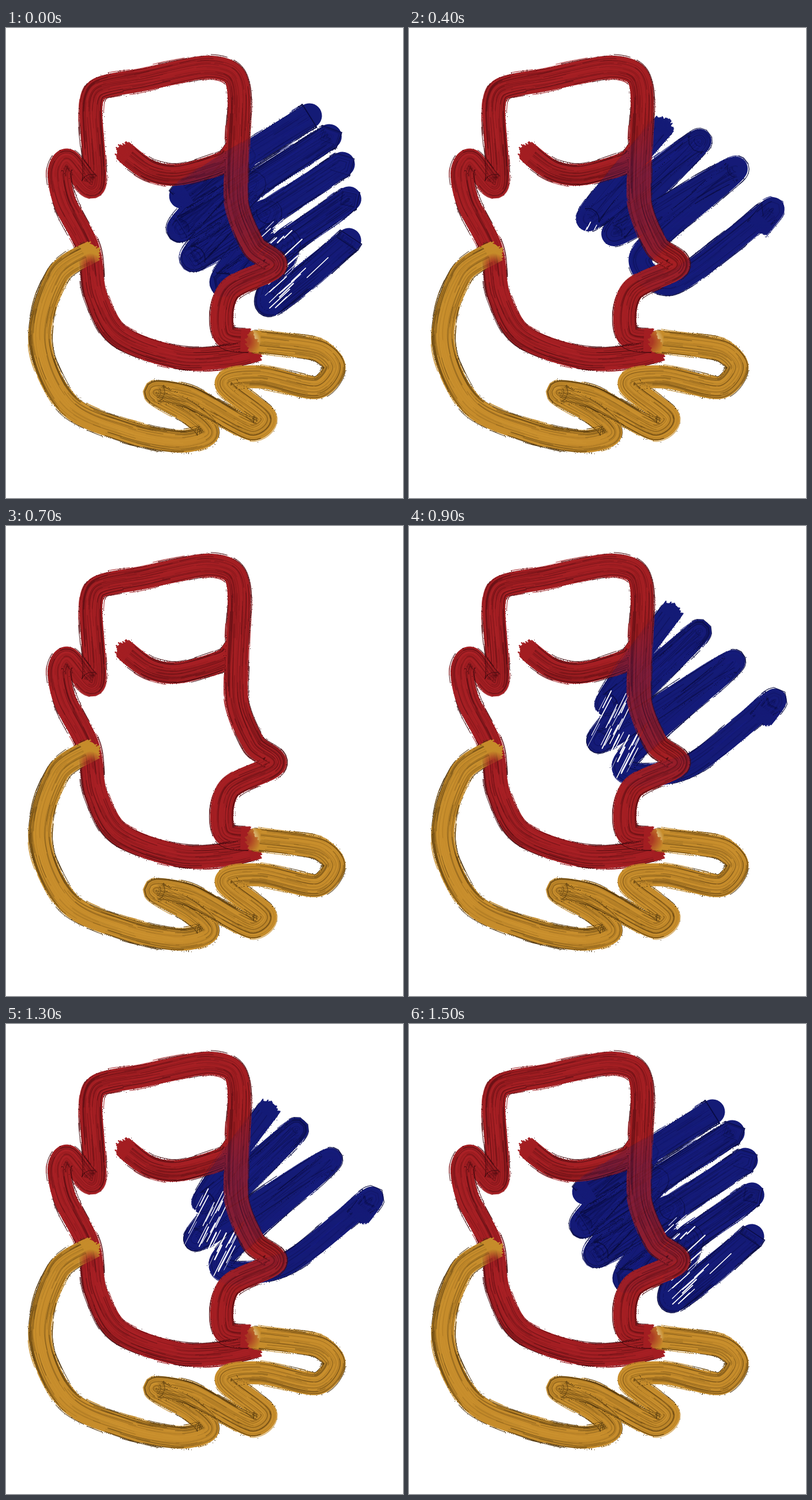
Write an HTML page with a canvas that moves like this. It is 688x814 px and loops after 1.6 s.

```html
<!DOCTYPE html>
<html lang="en">
<head>
<meta charset="utf-8">
<title>Painted face</title>
<style>
html, body { margin: 0; width: 100%; height: 100%; overflow: hidden; background: #fff; }
canvas { display: block; }
</style>
</head>
<body>
<canvas id="stage" width="688" height="814"></canvas>
<script>
const W = 688, H = 814, STEP = 100;
const stage = document.getElementById('stage').getContext('2d');

const RED = { base: '#a31e22', light: '#b2272b', dark: '#450a0f' };
const GOLD = { base: '#c68c2b', light: '#d29735', dark: '#50360e' };
const BLUE = { base: '#151b77', light: '#182087', dark: '#0a0d42' };

function rng(seed) {
  return () => {
    seed = (seed + 0x6D2B79F5) | 0;
    let t = Math.imul(seed ^ (seed >>> 15), 1 | seed);
    t = (t + Math.imul(t ^ (t >>> 7), 61 | t)) ^ t;
    return ((t ^ (t >>> 14)) >>> 0) / 4294967296;
  };
}

function layer() {
  const c = document.createElement('canvas');
  c.width = W;
  c.height = H;
  return c.getContext('2d');
}

const mix = (a, b, t) => a.map((v, i) => v + (b[i] - v) * t);
const add = (a, b) => a.map((v, i) => v + b[i]);
const dist = (a, b) => Math.hypot(b[0] - a[0], b[1] - a[1]);
const arc = ([a, c, b], t) => mix(mix(a, c, t), mix(c, b, t), t);

// Smooth curve through key points, sampled about every 3 px, with unit normals
function curve(keys) {
  const at = i => keys[Math.max(0, Math.min(keys.length - 1, i))];
  const tangent = (i, len) => {
    const a = at(i - 1), b = at(i + 1), d = dist(a, b) || 1;
    return [0, 1].map(k => (b[k] - a[k]) / d * Math.min(len, d / 2));
  };
  const s = [];
  for (let i = 0; i < keys.length - 1; i++) {
    const p = at(i), q = at(i + 1), len = dist(p, q);
    const m = tangent(i, len), w = tangent(i + 1, len);
    const n = Math.max(3, Math.round(len / 3));
    for (let j = 0; j < n; j++) {
      const t = j / n, u = 1 - t, ease = t * t * (3 - 2 * t);
      const [x, y] = [0, 1].map(k => p[k] + (q[k] - p[k]) * ease + t * u * (u * m[k] - t * w[k]));
      s.push({ x, y });
    }
  }
  s.forEach((q, i) => {
    const a = s[Math.max(0, i - 2)], b = s[Math.min(s.length - 1, i + 2)];
    const l = Math.hypot(b.x - a.x, b.y - a.y) || 1;
    q.nx = -(b.y - a.y) / l;
    q.ny = (b.x - a.x) / l;
  });
  return s;
}

function trace(g, s, from, to, offset) {
  g.beginPath();
  for (let i = Math.max(0, from); i < Math.min(s.length, to); i++) {
    const q = s[i], o = offset(i);
    g.lineTo(q.x + q.nx * o, q.y + q.ny * o);
  }
  g.stroke();
}

// A bristle brush: solid core, light and dark hairs, ragged rim, frayed ends
function brush(g, keys, width, tone, seed, hairs) {
  const s = curve(keys), rand = rng(seed), n = s.length, half = width / 2;
  const flip = () => (rand() < 0.5 ? -1 : 1);
  g.lineJoin = g.lineCap = 'round';
  g.globalAlpha = 1;
  g.strokeStyle = tone.base;
  g.lineWidth = width - 2;
  trace(g, s, 4, n - 4, () => 0);

  for (let k = 0; k < n * hairs; k++) {
    const dark = rand() < 0.62, side = rand() * 2 - 1;
    const from = Math.floor(rand() * (n + 20)) - 20, phase = rand() * 6;
    g.strokeStyle = dark ? tone.dark : tone.light;
    g.globalAlpha = dark ? 0.1 + 0.4 * rand() * (0.5 + Math.abs(side)) : 0.3;
    g.lineWidth = 0.6 + rand() * 1.3;
    trace(g, s, from, from + 12 + rand() * 48, i => side * (half - 1) + Math.sin(i / 14 + phase));
  }

  g.lineWidth = 1.2;
  g.globalAlpha = 0.8;
  for (let k = 0; k < n * 0.2; k++) {
    const o = flip() * (half - 1 + rand() * 2), from = Math.floor(rand() * n);
    g.strokeStyle = rand() < 0.5 ? tone.dark : tone.base;
    trace(g, s, from, from + 4 + rand() * 16, i => o + Math.sin(i / 5) * 0.6);
  }

  g.globalAlpha = 1;
  g.fillStyle = tone.dark;
  for (let k = 0; k < n * 1.5; k++) {
    const q = s[Math.floor(rand() * n)], o = flip() * (half - 1.5 + rand() * rand() * 4);
    g.fillRect(Math.round(q.x + q.nx * o), Math.round(q.y + q.ny * o), 1, 1);
  }

  g.lineWidth = 2.4;
  g.strokeStyle = tone.base;
  for (const [a, b] of [[s[0], s[5]], [s[n - 1], s[n - 6]]]) {
    const l = Math.hypot(a.x - b.x, a.y - b.y) || 1;
    for (let o = -half + 2; o < half - 1; o += 2) {
      const reach = 8 + (half - Math.abs(o) * 0.6) * (0.5 + rand() * 0.5);
      const x = b.x + a.nx * o, y = b.y + a.ny * o;
      g.beginPath();
      g.moveTo(x, y);
      g.lineTo(x + (a.x - b.x) / l * reach, y + (a.y - b.y) / l * reach);
      g.stroke();
    }
  }
}

// Dry patch: thin slits of bare paper
function scratch(g, { at, size, angle }, rand) {
  g.save();
  g.globalCompositeOperation = 'destination-out';
  g.translate(...at);
  g.rotate(angle);
  for (let k = 0; k < size / 3; k++) {
    const o = (rand() - 0.5) * size, from = (rand() - 0.6) * size * 1.5;
    g.lineWidth = 0.6 + rand() * 1.8;
    g.beginPath();
    g.moveTo(from, o);
    g.lineTo(from + size * (0.3 + rand() * 0.6), o + rand() * 2 - 1);
    g.stroke();
  }
  g.restore();
}

function fade(g, x, y, r, alpha) {
  const f = g.createRadialGradient(x, y, r * 0.3, x, y, r);
  f.addColorStop(0, `rgba(0,0,0,${alpha})`);
  f.addColorStop(1, 'rgba(0,0,0,0)');
  g.globalCompositeOperation = 'destination-out';
  g.fillStyle = f;
  g.fillRect(x - r, y - r, 2 * r, 2 * r);
  g.globalCompositeOperation = 'source-over';
}

// From the chin round the back of the head, over the brow, down to the neck
const OUTLINE = [
  [432, 558], [385, 569], [300, 571], [196, 533], [156, 465], [142, 382], [102, 302], [92, 250],
  [107, 229], [152, 272], [147, 140], [160, 106], [240, 89], [345, 68], [392, 79], [404, 120],
  [400, 300], [430, 378], [465, 413], [386, 456], [378, 530], [424, 541]
];
const EYE = [[204, 214], [250, 247], [300, 254], [378, 231], [400, 205]];
const SHOULDER = [
  [147, 388], [90, 427], [59, 540], [106, 650], [205, 697], [300, 716], [350, 702], [320, 668],
  [258, 631], [320, 640], [425, 695], [449, 674], [381, 616], [440, 604], [538, 623], [569, 588],
  [540, 558], [427, 542]
];

// One line running to and fro between two arcs, with a short tail
function zigzag(top, bottom, tail) {
  const keys = [], turns = 4;
  for (let i = 0; i < turns; i++) {
    const t = i / (turns - 1);
    keys.push(arc(top, t), arc(bottom, t));
  }
  const end = top[2];
  keys.splice(-2, 2, bottom[2], end, add(end, tail));
  return keys;
}

// Nearly parallel strokes, each drawn out and back, joined on the left
function hatch(right, left) {
  const keys = [], strokes = 5;
  for (let i = 0; i < strokes; i++) {
    const t = i / (strokes - 1), r = arc(right, t), l = arc(left, t);
    keys.push(l, r, l);
    if (t < 1) keys.push(mix(l, r, 0.5));
  }
  return keys;
}

const wide = hatch(
  [[526, 152], [606, 212], [594, 368]],
  [[306, 290], [272, 416], [456, 478]]);
const sharp = zigzag(
  [[472, 167], [555, 180], [640, 335]],
  [[308, 297], [352, 375], [496, 430]], [5, -4]);
const round = zigzag(
  [[440, 170], [537, 190], [628, 314]],
  [[310, 332], [372, 362], [456, 442]], [-27, 36]);
const dry = zigzag(
  [[455, 147], [521, 188], [632, 302]],
  [[342, 310], [276, 425], [476, 420]], [-25, 38]);
const blend = (p, q, t) => p.map((v, i) => mix(v, q[i], t));

const poses = {
  wide: {
    keys: wide, width: 45, dry: [
      { at: [455, 365], size: 36, angle: -0.75 },
      { at: [478, 435], size: 58, angle: -0.75 }
    ]
  },
  early: { keys: blend(sharp, dry, 0.2).map(p => add(p, [7, 0])), width: 39, dry: [] },
  sharp: { keys: sharp, width: 39, dry: [{ at: [308, 318], size: 22, angle: -1.1 }] },
  late: { keys: blend(sharp, round, 0.5), width: 40, dry: [] },
  round: { keys: round, width: 42, dry: [{ at: [314, 352], size: 22, angle: -1.1 }] },
  dry: {
    keys: dry, width: 41, dry: [
      { at: [337, 345], size: 56, angle: -1.1 },
      { at: [372, 390], size: 56, angle: -1.1 }
    ]
  },
  none: null
};
const order = 'wide early sharp late round dry dry none round dry dry round sharp dry sharp wide'.split(' ');

const face = layer();
brush(face, EYE, 39, RED, 21, 0.8);
brush(face, OUTLINE, 42, RED, 5, 0.85);

const shoulder = layer();
brush(shoulder, SHOULDER, 41, GOLD, 9, 0.85);
fade(shoulder, 147, 412, 22, 0.8);
fade(shoulder, 414, 543, 28, 0.75);

// Faint copy of the blue that shines through the upper part of the red line
function glaze(blue) {
  const g = layer();
  g.drawImage(blue.canvas, 0, 0);
  const f = g.createLinearGradient(0, 170, 0, 430);
  f.addColorStop(0, 'rgba(0,0,0,0.1)');
  f.addColorStop(0.3, 'rgba(0,0,0,0.26)');
  f.addColorStop(0.6, 'rgba(0,0,0,0.24)');
  f.addColorStop(1, 'rgba(0,0,0,0.06)');
  g.globalCompositeOperation = 'destination-in';
  g.fillStyle = f;
  g.fillRect(0, 0, W, H);
  return g;
}

function compose(pose, seed) {
  const out = layer(), blue = layer(), rand = rng(seed);
  if (pose) {
    brush(blue, pose.keys, pose.width, BLUE, seed, 0.4);
    pose.dry.forEach(spot => scratch(blue, spot, rand));
  }
  out.fillStyle = '#fff';
  out.fillRect(0, 0, W, H);
  for (const g of [blue, face, glaze(blue), shoulder]) out.drawImage(g.canvas, 0, 0);
  return out.canvas;
}

const pictures = {};
Object.keys(poses).forEach((name, i) => { pictures[name] = compose(poses[name], 100 + i * 17); });

const start = performance.now();
function draw() {
  const slot = Math.floor((performance.now() - start) / STEP) % order.length;
  stage.drawImage(pictures[order[slot]], 0, 0);
  requestAnimationFrame(draw);
}
draw();
</script>
</body>
</html>
```
